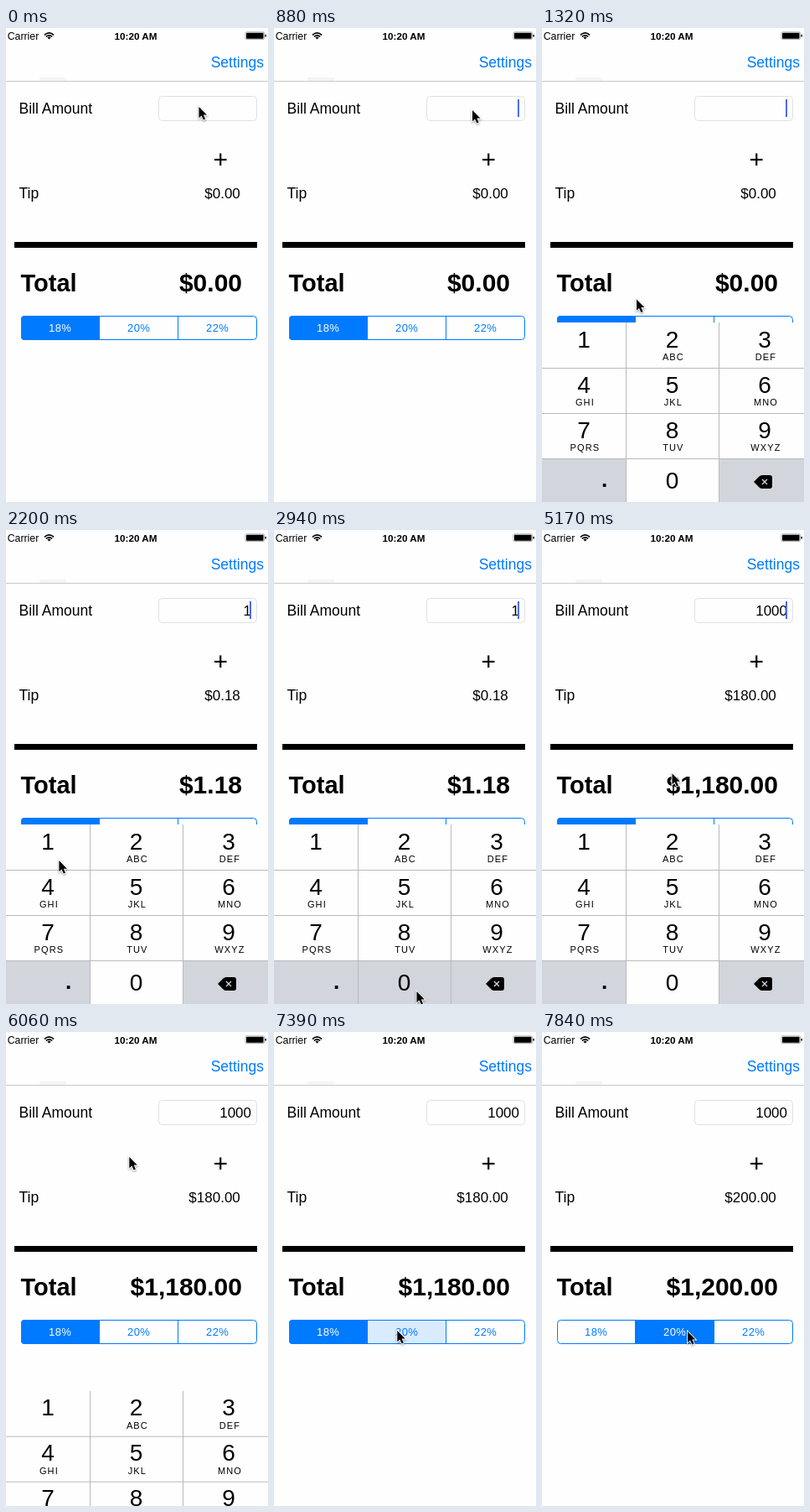
An HTML page that plays this animation: 313x565 px, repeating every 7.99 s.

```html
<!DOCTYPE html>
<html lang="en">
<head>
<meta charset="utf-8">
<title>Tip calculator</title>
<style>
html, body { margin: 0; height: 100%; overflow: hidden; background: #fefefe; }
svg { display: block; width: 100vw; height: 100vh; font: 17px "Liberation Sans", Arial, sans-serif; }
.label { font-size: 17.5px; }
.num { text-anchor: end; font-kerning: none; }
.mid { text-anchor: middle; }
.seg { font-size: 13px; letter-spacing: .4px; }
.digit { font-size: 28px; }
.abc { font-size: 11px; letter-spacing: 1.1px; }
</style>
</head>
<body>
<svg viewBox="0 0 313 565">
  <defs><clipPath id="round"><rect x="18" y="343" width="282" height="29" rx="4"/></clipPath></defs>

  <text x="1.7" y="14" font-size="12.3">Carrier</text>
  <g fill="none" stroke="#000" stroke-width="1.6">
    <path d="M45.9 8.3Q51.5 3.4 57.1 8.3M47.8 10.4Q51.5 7.2 55.2 10.4"/>
    <path d="M49.4 11.4Q51.5 9.8 53.6 11.4L51.5 13.6Z" fill="#000" stroke="none"/>
  </g>
  <text class="mid" x="155" y="14" font-size="11.7" font-weight="bold">10:20 AM</text>
  <rect x="286" y="4.8" width="22.5" height="8.8" rx="1.5" fill="#fff" stroke="#777" stroke-width=".6"/>
  <rect x="287" y="5.7" width="20.5" height="7" rx=".8"/>
  <rect x="309.5" y="7.7" width="1.4" height="3" rx=".7"/>
  <text class="label" x="244.7" y="47" fill="#007aff">Settings</text>
  <rect x="40" y="59" width="32" height="4" fill="#f4f4f4"/>
  <rect y="63" width="313" height="1" fill="#c9c9c9"/>

  <text class="label" x="15.5" y="102">Bill Amount</text>
  <rect x="182.5" y="81.5" width="117" height="29" rx="4" fill="#fefefe" stroke="#e0e0e0"/>
  <text class="num" id="bill" x="293" y="102"></text>
  <rect id="caret" x="291" y="85" width="2" height="21" fill="#4a6cf0"/>
  <text class="mid" x="256.3" y="167" font-size="30">+</text>
  <text class="label" x="15.5" y="203">Tip</text>
  <text class="num" id="tip" x="279.8" y="203"></text>
  <rect x="10" y="255" width="290" height="7"/>
  <g font-weight="bold">
    <text x="17.5" y="313.7" font-size="29">Total</text>
    <text class="num" id="total" x="282" y="313.7" font-size="30"></text>
  </g>

  <g id="segments" clip-path="url(#round)"></g>
  <g fill="none" stroke="#007aff">
    <rect x="18.5" y="343.5" width="281" height="28" rx="4"/>
    <path d="M111.5 343V372M205.5 343V372"/>
  </g>
  <g id="labels"></g>

  <g id="keyboard">
    <g id="keys"></g>
    <path d="M0 405.5H313M0 459.5H313M0 513.5H313M100.5 351V565M211.5 351V565" stroke="#b9babd"/>
    <g id="caps"></g>
    <text class="mid" x="74.7" y="547" font-size="26" font-weight="bold">.</text>
    <path d="M253 541L259.5 534.5Q261 533 263 533H272Q275 533 275 536V546Q275 549 272 549H263Q261 549 259.5 547.5Z"/>
    <path d="M263 538L269 544M269 538L263 544" stroke="#d2d5db" stroke-width="1.4"/>
  </g>

  <path id="cursor" d="M0 0V13.2L3 10.4L5.4 15.5L7.6 14.5L5.3 9.6H9.4Z" stroke="#fff" paint-order="stroke" stroke-width="1.8" style="filter:drop-shadow(0 1px 1px #0006)"/>
</svg>
<script>
const LOOP = 7990, STEP = 148, LEAD = 20;   // ms; the screen refreshes once per STEP
const BLUE = '#007aff', GRAY = '#d2d5db', PAPER = '#fefefe';
const $ = id => document.getElementById(id);

// All times below count refreshes.
const HOME = [230.5, 94];
const moves = [   // from, to, x, y
  [0, 2, 237, 98], [6, 9, 113, 323.5], [9, 11, 51, 376], [14, 19, 170.5, 550],
  [32, 37, 147.3, 149], [41, 46, 147.3, 356], [51, 53, 174, 357]
];
const taps = [[13, '1'], [20, '0'], [22, '0'], [25, '0']];
const FOCUS = 6, BLUR = 40, TOUCH = 50;

const money = n => '$' + n.toLocaleString('en-US', { minimumFractionDigits: 2, maximumFractionDigits: 2 });

function ease(from, to, n) {
  const u = Math.min(1, Math.max(0, (n - from) / (to - from)));
  return u * u * (3 - 2 * u);
}

function add(parent, tag, attrs, text = '') {
  const el = document.createElementNS('http://www.w3.org/2000/svg', tag);
  for (const k in attrs) el.setAttribute(k, attrs[k]);
  el.textContent = text;
  return $(parent).appendChild(el);
}

const rates = [18, 20, 22];
const segments = rates.map((r, i) => ({
  box: add('segments', 'rect', { x: 18 + 94 * i, y: 343, width: 94, height: 29 }),
  label: add('labels', 'text', { class: 'mid seg', x: 64.7 + 94 * i, y: 362 }, r + '%')
}));

const columns = [[0, 100, 50], [100, 111, 155.5], [211, 102, 266]];   // x, width, middle
const letters = ['', 'ABC', 'DEF', 'GHI', 'JKL', 'MNO', 'PQRS', 'TUV', 'WXYZ'];
const keys = [...'123456789.<'.replace('.', '.0')].map((name, i) => {
  const [x, width, mid] = columns[i % 3], y = 351 + 54 * Math.floor(i / 3);
  const box = add('keys', 'rect', { x, y, width, height: 54 });
  if (/\d/.test(name)) add('caps', 'text', { class: 'mid digit', x: mid, y: y + (i < 9 ? 29.6 : 36.4) }, name);
  if (letters[i]) add('caps', 'text', { class: 'mid abc', x: mid + 1.4, y: y + 45 }, letters[i]);
  return { name, box };
});

function pointer(n) {
  let [x, y] = HOME;
  for (const [from, to, toX, toY] of moves) {
    const e = ease(from, to, n);
    x += (toX - x) * e;
    y += (toY - y) * e;
  }
  return [x, y];
}

function caret(n) {
  if (n < FOCUS || n >= BLUR) return 0;
  return n < 33 ? 1 - ease(29, 31, n) : 1;
}

function draw(n) {
  const bill = Number(taps.filter(([when]) => n > when).map(([, key]) => key).join(''));
  const down = taps.find(([when]) => n === when)?.[1];
  const pick = n > TOUCH ? 1 : 0;
  const tip = bill * rates[pick] / 100;
  const hidden = 1 - ease(FOCUS, 9, n) + ease(BLUR - .32, 43, n);

  $('bill').textContent = bill || '';
  $('tip').textContent = money(tip);
  $('total').textContent = money(bill + tip);
  $('caret').setAttribute('opacity', caret(n));
  segments.forEach(({ box, label }, i) => {
    box.setAttribute('fill', i === pick ? BLUE : i === 1 && n === TOUCH ? '#d8ebff' : PAPER);
    label.setAttribute('fill', i === pick ? '#fff' : BLUE);
  });
  for (const { name, box } of keys)
    box.setAttribute('fill', name === down || '.<'.includes(name) ? GRAY : PAPER);
  $('keyboard').setAttribute('transform', `translate(0 ${220 * hidden})`);
  $('cursor').setAttribute('transform', `translate(${pointer(n)})`);
}

function tick() {
  draw(Math.floor((performance.now() % LOOP + LEAD) / STEP));
  requestAnimationFrame(tick);
}
tick();
</script>
</body>
</html>
```
